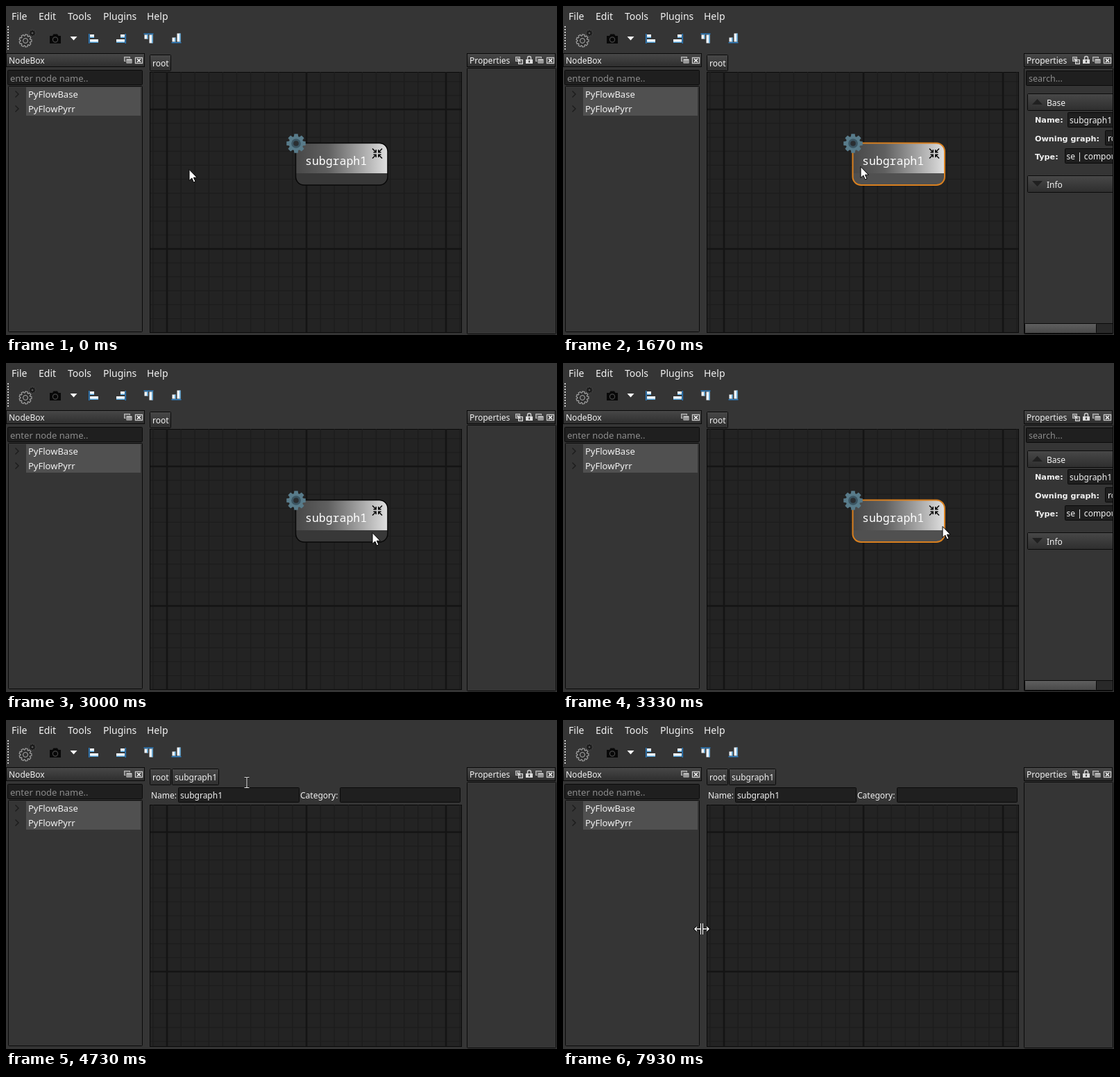
Write an HTML page that moves like this. It is 794 by 474 pixels and loops after 8000 ms.

```html
<!DOCTYPE html>
<html>
<head>
<meta charset="utf-8">
<style>
html, body { margin: 0; width: 100%; height: 100%; overflow: hidden; background: #353535; }
svg { display: block; width: 794px; height: 474px; }
text { font: 12px "Noto Sans", "Open Sans", sans-serif; fill: #f2f2f2; white-space: pre; }
.menu { font-size: 14px; }
.tree { font-size: 13px; }
.hint { font-size: 13px; fill: #8c8c8c; }
.bold { font: bold 11.2px "DejaVu Sans", sans-serif; }
.title { font: 16.5px "Noto Sans Mono", monospace; fill: #fff; }
</style>
</head>
<body>
<svg id="stage" viewBox="0 0 794 474"></svg>
<script>
const stage = document.getElementById('stage');

const rect = (x, y, w, h, fill, extra = '') =>
  `<rect x="${x}" y="${y}" width="${w}" height="${h}" fill="${fill}" ${extra}/>`;
const box = (x, y, w, h, fill, r = 0) =>
  rect(x + .5, y + .5, w - 1, h - 1, fill, `rx="${r}" stroke="#0a0a0a"`);
const text = (x, y, s, cls = '') => `<text x="${x}" y="${y}" class="${cls}">${s}</text>`;
const path = (d, fill, extra = '') => `<path d="${d}" fill="${fill}" ${extra}/>`;
const line = (d, color, w = 1) => path(d, 'none', `stroke="${color}" stroke-width="${w}"`);
const group = (id, body, extra = '') => `<g id="${id}" ${extra}>${body}</g>`;
const at = (x, y, body) => `<g transform="translate(${x} ${y})">${body}</g>`;

function gear(r, inner, teeth, half) {
  const pts = [];
  for (let i = 0; i < teeth; i++) {
    const a = i * 2 * Math.PI / teeth;
    for (const [k, rad] of [[-1.6, inner], [-1, r], [1, r], [1.6, inner]])
      pts.push((rad * Math.cos(a + k * half)).toFixed(2) + ' ' + (rad * Math.sin(a + k * half)).toFixed(2));
  }
  return 'M' + pts.join('L') + 'Z';
}

function grid(top, major) {
  let thin = '', thick = '';
  for (let i = -1; i < 22; i++) {
    const x = (232 + i * 20.1).toFixed(1);
    if (i % 10) thin += `M${x} ${top}V470`; else thick += `M${x} ${top}V470`;
  }
  for (let i = -3; i < 17; i++) {
    const y = major + i * 20.1;
    if (y < top || y > 470) continue;
    if (i % 10) thin += `M208 ${y.toFixed(1)}H656`; else thick += `M208 ${y.toFixed(1)}H656`;
  }
  return box(207, top, 450, 471 - top, '#232323') +
    line(thin, '#1c1c1c', 1.2) + line(thick, '#141414', 2.6);
}

const closeIcon = at(0, 0, rect(.5, .5, 10, 8, '#3a3a3a', 'stroke="#c8c8c8" stroke-width="1.4"') +
  line('M3 2.2L8 6.8M8 2.2L3 6.8', '#f0f0f0', 1.6));
const floatIcon = rect(.5, .5, 8, 6, '#777', 'stroke="#bbb"') +
  rect(3, 3, 9, 7, '#e0e0e0', 'stroke="#333"') + rect(4, 5, 7, 4, '#999');
const copyIcon = rect(.5, .5, 6, 6, '#777', 'stroke="#bbb"') +
  rect(4.5, 4.5, 6, 6, '#666', 'stroke="#ddd"') + line('M3 3L7 7', '#eee', 1.5);
const lockIcon = line('M2.5 5V3a2.5 2.5 0 0 1 5 0V5', '#ccc', 1.5) +
  rect(0, 5, 10, 6, '#dcdcdc') + rect(4, 6.5, 2, 3, '#444');

// One align icon: an edge line with a short and a long bar.
const align = rect(0, 0, 1.5, 14, '#2c7fc4') +
  rect(2, 1, 6, 5, '#f4f8fb') + rect(2, 4.6, 6, 1.4, '#4fa3dc') +
  rect(2, 8, 12, 5, '#f4f8fb') + rect(2, 11.6, 12, 1.4, '#4fa3dc');
const alignAt = matrix => `<g transform="matrix(${matrix})">${align}</g>`;

const toolbar =
  rect(2, 29, 2, 2, '#d0d0d0') +
  Array.from({ length: 9 }, (_, i) => rect(2, 29 + i * 4, 2, 2, '#c4c4c4')).join('') +
  at(28, 50, path(gear(9, 7, 9, .17), '#2c2c2c', 'stroke="#a0a0a0" stroke-width="1.2"') +
    '<circle r="3.5" fill="#303030" stroke="#b0b0b0"/>') +
  at(38, 39, path(gear(5, 3.6, 8, .18), '#151515', 'stroke="#555" stroke-width=".6"') +
    '<circle r="1.5" fill="#555"/>') +
  path('M63 43H67L68.5 40.5H74L75.500 43H79V54H63Z', '#080808') +
  '<circle cx="71" cy="48.500" r="3.600" fill="#080808" stroke="#484848" stroke-width="1.2"/>' +
  path('M92.500 44H102.500L97.500 49.500Z', '#fff') +
  alignAt('1 0 0 1 119 40') + alignAt('-1 0 0 1 173 40') +
  alignAt('0 1 1 0 198.500 39.500') + alignAt('0 -1 1 0 238.500 53.500');

const left =
  box(0, 68, 200, 20, 'url(#bar)') + text(4, 83, 'NodeBox') +
  at(170, 73, floatIcon) + at(186, 74, closeIcon) +
  box(2, 92, 195, 22, '#1f1f1f', 1) + text(6, 109, 'enter node name..', 'hint') +
  box(3, 115, 194, 355, '#353535', 1) + rect(29, 117, 165, 41, '#505050') +
  line('M13.500 122.500L18 127L13.500 131.500M13.500 143.500L18 148L13.500 152.500', '#1c1c1c', 1.4) +
  text(32, 132, 'PyFlowBase', 'tree') + text(32, 153, 'PyFlowPyrr', 'tree');

const right =
  box(664, 68, 128, 20, 'url(#bar)') + text(668, 83, 'Properties') +
  at(734, 73, copyIcon) + at(749, 72, lockIcon) + at(763, 73, floatIcon) + at(779, 74, closeIcon) +
  box(664, 89, 129, 384, '#353535', 1);

const field = (x, y, w) => box(x, y, w, 22, '#1f1f1f', 1);
const section = (y, name, mark) => box(669, y, 140, 25, 'url(#bar)', 1) +
  path(mark, '#202020') + text(697, y + 17.500, name);

const props = `<g clip-path="url(#dock)">` +
  field(667, 93, 140) + `<text x="671" y="109" style="fill:#8c8c8c;font-size:12.5px">search...</text>` +
  section(126, 'Base', 'M676 142L683.500 134L691 142Z') +
  text(680, 168, 'Name:', 'bold') + field(727, 153, 90) + text(730, 169, 'subgraph1') +
  text(680, 194.500, 'Owning graph:', 'bold') + field(781, 179, 90) + text(785, 195, 'root') +
  text(680, 220.500, 'Type:', 'bold') + field(723, 205, 90) +
  `<g clip-path="url(#type)">${text(725.500, 221, 'se | compound')}</g>` +
  section(244, 'Info', 'M676 252L683.500 260L691 252Z') +
  box(665, 457, 140, 15, '#292929') + box(665, 457, 104, 15, 'url(#thumb)', 1) + '</g>';

const inward = line('M0 0L5 5M1.500 5.200H5.200V1.500', '#050505', 1.5);
const node =
  `<rect id="body" x="418" y="198" width="132" height="60" rx="12"/>` +
  path('M418 241V210A12 12 0 0 1 430 198H538A12 12 0 0 1 550 210V241Z', 'url(#head)') +
  `<rect id="edge" x="417.500" y="197.500" width="132.500" height="60.500" rx="12" fill="none"/>` +
  text(431, 229, 'subgraph1', 'title') +
  [[1, 1], [-1, 1], [1, -1], [-1, -1]].map(([a, b]) =>
    `<g transform="matrix(${a} 0 0 ${b} ${535 - 7 * a} ${212.500 - 7 * b})">${inward}</g>`).join('') +
  at(418, 198, path(gear(14, 10.500, 8, .19), '#587b8a') +
    '<circle r="6.800" fill="#3b5562"/><circle r="3.800" fill="#2a2e31"/>');

const tab = (x, w, name) => box(x, 70, w, 24, 'url(#bar)', 1) + text(x + 4, 87, name);
const inside = tab(239, 68, 'subgraph1') +
  text(209, 113, 'Name:') + field(248, 97, 175) + text(251, 113, 'subgraph1') +
  text(424, 113, 'Category:') + field(481, 97, 174) + grid(122, 161.500);

const beam = 'M-3.500 -7.500H-1Q0 -7.500 0 -6.500V6.500Q0 7.500 -1 7.500H-3.500M3.500 -7.500H1Q0 -7.500 0 -6.500M0 6.500Q0 7.500 1 7.500H3.500';
const split = 'M-1.500 -8V8M1.500 -8V8M-10 0H-2M2 0H10M-7 -3L-10 0L-7 3M7 -3L10 0L7 3';
const cursors =
  group('arrow', path('M0 .5V16.500L3.800 13L6.400 19L9 18L6.400 12.200H11.300Z', '#fff', 'stroke="#000"')) +
  group('beam', line(beam, '#111', 2.6) + line(beam, '#e8e8e8', 1.1)) +
  group('split', line(split, '#000', 3.4) + line(split, '#fff', 1.4));

const gradient = (id, dir, ...stops) => `<linearGradient id="${id}" x2="${dir}" y2="${1 - dir}">` +
  stops.map(([o, c]) => `<stop offset="${o}" stop-color="${c}"/>`).join('') + '</linearGradient>';

stage.innerHTML = '<defs>' +
  gradient('bar', 0, [0, '#484848'], [1, '#2e2e2e']) +
  gradient('thumb', 0, [0, '#606060'], [1, '#484848']) +
  gradient('head', 1, [0, '#484848'], [.35, '#606060'], [.6, '#909090'], [1, '#e0e0e0']) +
  `<clipPath id="dock">${rect(665, 90, 127, 382, '#000')}</clipPath>` +
  `<clipPath id="type">${rect(724, 206, 68, 20, '#000')}</clipPath></defs>` +
  rect(0, 0, 794, 474, '#353535') +
  [[8, 'File'], [47, 'Edit'], [89, 'Tools'], [140, 'Plugins'], [203, 'Help']]
    .map(([x, s]) => text(x, 20, s, 'menu')).join('') +
  toolbar + left + right + tab(207, 31, 'root') +
  group('outer', grid(95, 149) + node) + group('inner', inside) +
  group('props', props) + cursors;

const el = id => document.getElementById(id);
const show = (id, on) => el(id).setAttribute('display', on ? 'inline' : 'none');

// Pointer path: tick (1/15 s), x, y
const keys = [
  [4, 264, 235], [7, 355, 275], [9, 455, 318], [10, 452, 304], [15, 452, 304],
  [21, 429, 231], [33, 429, 231], [37, 431, 290], [40, 431, 290],
  [46, 547, 235], [54, 547, 235], [57, 495, 274], [62, 313, 165], [63, 313, 165],
  [68, 337, 90], [69, 337, 90], [71, 347, 90], [82, 347, 90],
  [87, 294, 76], [97, 294, 76], [98, 293, 75], [102, 227, 76], [108, 227, 76],
  [109, 226, 76], [116, 226, 76], [119, 200, 301]
];

function pointer(t) {
  const i = keys.findIndex(k => k[0] >= t);
  if (i === 0) return keys[0].slice(1);
  const [t0, x0, y0] = keys[i - 1], [t1, x1, y1] = keys[i];
  const k = (t - t0) / (t1 - t0);
  return [Math.round(x0 + (x1 - x0) * k), Math.round(y0 + (y1 - y0) * k)];
}

function draw() {
  const tick = Math.min(119, Math.floor((performance.now() % 8000 + 4) * .015));
  const within = (a, b) => tick >= a && tick < b;
  const selected = within(23, 39) || within(47, 51);
  const kind = within(68, 86) ? 'beam' : tick === 119 ? 'split' : 'arrow';

  show('outer', tick < 51);
  show('inner', tick >= 51);
  show('props', within(25, 40) || within(49, 51));
  el('body').setAttribute('fill', selected ? '#505050' : '#383838');
  el('edge').setAttribute('stroke', selected ? '#d9801f' : '#080808');
  el('edge').setAttribute('stroke-width', selected ? 2 : 1.5);

  const [x, y] = pointer(tick);
  for (const id of ['arrow', 'beam', 'split']) show(id, id === kind);
  el(kind).setAttribute('transform', `translate(${x} ${y})`);
  requestAnimationFrame(draw);
}
draw();
</script>
</body>
</html>
```
